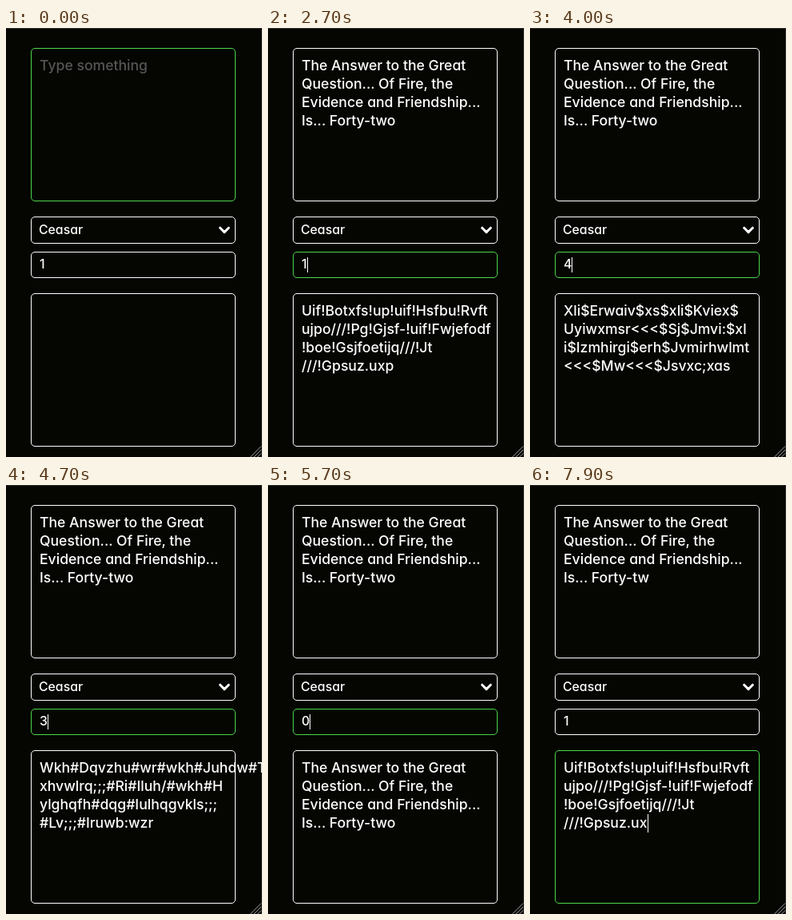
These frames come from a looping animation (320 px wide and 537 px high, 8000 ms). An HTML page:

```html
<!DOCTYPE html>
<html lang="en">
<head>
<meta charset="utf-8">
<title>Cipher form</title>
<style>
  html, body { margin: 0; width: 100%; height: 100%; overflow: hidden; background: #050502; }
  svg { display: block; width: 100%; height: 100%; }
  text {
    font-family: Inter, Lato, sans-serif;
    font-size: 17.6px;
    font-weight: 500;
    font-feature-settings: "cv11";
    fill: #fff;
    white-space: pre;
  }
  .small { font-size: 15.8px; }
  .hint { fill: #565656; }
  .box { fill: none; stroke: #fff; }
  .focus { stroke: #4cd64a; }
</style>
</head>
<body>
<svg id="stage" viewBox="0 0 320 537">
  <rect width="320" height="537" fill="#050502"/>
  <path d="M0 .5H319.5V537" fill="none" stroke="#2c2c2e"/>
  <path d="M305.5 537L319 523.5M310 537L319 528M314.5 537L319 532.5" stroke="#a0a0a0" fill="none"/>
  <path d="M267.7 250.2L273 255.6L278.3 250.2" fill="none" stroke="#fff" stroke-width="3" stroke-linecap="round" stroke-linejoin="round"/>
</svg>
<script>
const LOOP = 8000;
const LINE = 23;
const MESSAGE = 'The Answer to the Great Question... Of Fire, the Evidence and Friendship... Is... Forty-two';
// Characters on each full line, by key
const WRAPS = [[24, 25, 27], [28, 29, 21], [25, 25, 27], [25, 25, 25], [24, 23, 25]];
const INPUT = 0, KEY = 1, OUTPUT = 2;

// [start, characters, key, focused field, caret shown]
const FULL = MESSAGE.length;
const STEPS = [
  [0, 0, 1, INPUT, false],
  [700, 0, 1, INPUT, true],
  [1400, FULL, 1, INPUT, true],
  [1900, FULL, 1, INPUT, false],
  [2700, FULL, 1, KEY, true],
  [3400, FULL, 2, KEY, true],
  [3700, FULL, 3, KEY, true],
  [4000, FULL, 4, KEY, true],
  [4700, FULL, 3, KEY, true],
  [5000, FULL, 2, KEY, false],
  [5400, FULL, 1, KEY, true],
  [5700, FULL, 0, KEY, true],
  [6200, FULL, 1, KEY, false],
  [6300, FULL, 1, KEY, true],
  [7400, FULL, 1, OUTPUT, true],
  [7900, FULL - 1, 1, OUTPUT, true]
];

const stage = document.getElementById('stage');

function add(tag, attrs, content = '') {
  const el = document.createElementNS('http://www.w3.org/2000/svg', tag);
  for (const name in attrs) el.setAttribute(name, attrs[name]);
  el.textContent = content;
  return stage.appendChild(el);
}

const addBox = (y, height) =>
  add('rect', { class: 'box', x: 31.5, y, width: 255, height, rx: 4.5 });

const addLines = y =>
  [0, 1, 2, 3].map(i => add('text', { x: 42, y: y + i * LINE }));

const boxes = [addBox(25.5, 191), addBox(280.5, 32), addBox(332.5, 191)];
addBox(236.5, 33);
add('text', { class: 'small', x: 41, y: 258 }, 'Ceasar');
const hint = add('text', { class: 'hint', x: 42, y: 53 }, 'Type something');
const keyText = add('text', { class: 'small', x: 42, y: 301 });
const inputLines = addLines(53);
const outputLines = addLines(360);
const caret = add('rect', { width: 1, fill: '#fff' });

function shift(char, key) {
  let code = char.charCodeAt(0);
  const lower = code >= 97 && code <= 122;
  code += key;
  if (lower && code > 122) code -= 26;
  if (!lower && code >= 48 && code <= 57) code += 10; // digits are skipped
  return String.fromCharCode(code);
}

const encode = (text, key) => [...text].map(c => shift(c, key)).join('');

function setLines(lines, text, wrap) {
  let start = 0;
  lines.forEach((line, i) => {
    const end = i < wrap.length ? start + wrap[i] : text.length;
    line.textContent = text.slice(start, end);
    start = end;
  });
}

function placeCaret(el, top, height) {
  const width = el.textContent ? el.getComputedTextLength() : 0;
  caret.setAttribute('x', Math.round(42 + width));
  caret.setAttribute('y', top);
  caret.setAttribute('height', height);
}

let shown;

function render(time) {
  const step = STEPS.findLast(s => s[0] <= time);
  if (step === shown) return;
  shown = step;
  const [, count, key, focus, caretOn] = step;
  const text = MESSAGE.slice(0, count);

  hint.style.display = count ? 'none' : '';
  keyText.textContent = key;
  setLines(inputLines, text, WRAPS[0]);
  setLines(outputLines, encode(text, key), WRAPS[key]);
  boxes.forEach((box, i) => box.classList.toggle('focus', i === focus));

  caret.style.display = caretOn ? '' : 'none';
  const row = count ? 3 : 0;
  if (focus === INPUT) placeCaret(inputLines[row], 36 + row * LINE, LINE);
  else if (focus === KEY) placeCaret(keyText, 287, 19);
  else placeCaret(outputLines[row], 343 + row * LINE, LINE);
}

const origin = performance.now();
function tick() {
  render((performance.now() - origin) % LOOP);
  requestAnimationFrame(tick);
}
tick();
</script>
</body>
</html>
```
